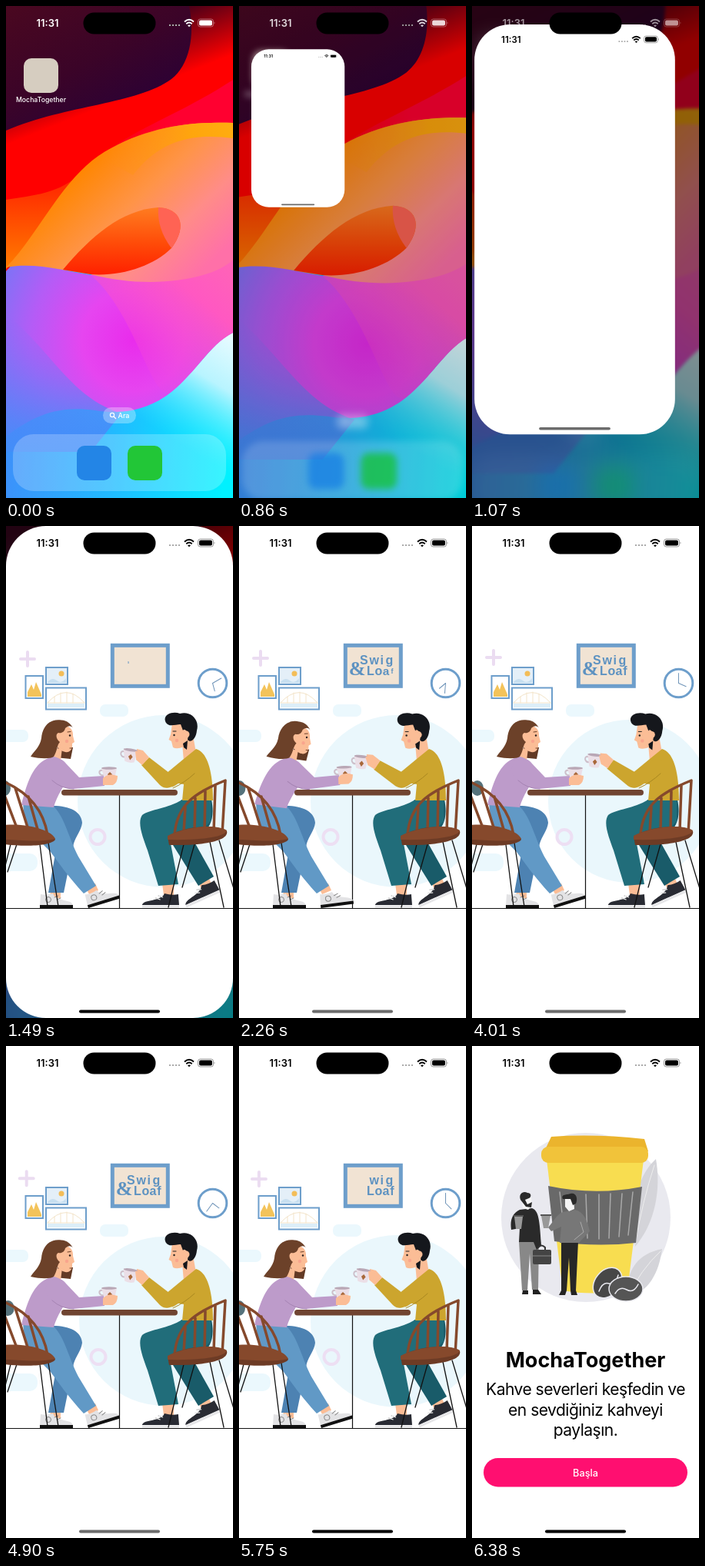
An HTML page that plays this animation: 295x640 px, repeating every 6450 ms.

```html
<!DOCTYPE html>
<html lang="tr">
<head>
<meta charset="utf-8">
<title>MochaTogether</title>
<style>
  html, body { margin: 0; width: 100%; height: 100%; overflow: hidden; background: #fff; }
  svg { display: block; width: 100vw; height: 100vh; font-family: Inter, "Open Sans", sans-serif; }
  text { text-anchor: middle; }
  .line { fill: none; stroke-linecap: round; stroke-linejoin: round; }
  .rail { stroke: #85492c; stroke-width: 3.5; }
  .leg { stroke: #111; stroke-width: 1.3; }
  .frame { stroke: #6d9ecb; stroke-width: 2; fill: #fff; }
  .skin { fill: #fbbd96; }
  .letter { font: bold 16px "Liberation Sans", Arial, sans-serif; fill: #5d92c1; }
  .amp { font: bold 26px "Liberation Serif", serif; }
</style>
</head>
<body>
<svg viewBox="0 0 295 640" preserveAspectRatio="none">
  <defs>
    <linearGradient id="dusk" x2=".75" y2="1"><stop stop-color="#4a0820"/><stop offset=".5" stop-color="#3b0428"/><stop offset="1" stop-color="#26003a"/></linearGradient>
    <linearGradient id="red" gradientUnits="userSpaceOnUse" x1="235" y1="0" x2="265" y2="75"><stop stop-color="#480018"/><stop offset="1" stop-color="#f00"/></linearGradient>
    <linearGradient id="crimson" x1="0" x2=".6"><stop stop-color="#f00"/><stop offset="1" stop-color="#ff0030"/></linearGradient>
    <linearGradient id="flame" x2="0" y2="1"><stop stop-color="#ff1c00"/><stop offset="1" stop-color="#ff7c00"/></linearGradient>
    <linearGradient id="orange" x2="1" y2=".75"><stop stop-color="#ff6a00"/><stop offset=".35" stop-color="#ff8600"/><stop offset=".6" stop-color="#ff9448"/><stop offset=".8" stop-color="#ff8c88"/><stop offset="1" stop-color="#ff70a8"/></linearGradient>
    <linearGradient id="gold" x1="0" x2="1"><stop stop-color="#ff8a10" stop-opacity="0"/><stop offset=".7" stop-color="#ffa60c"/><stop offset="1" stop-color="#ffac10"/></linearGradient>
    <linearGradient id="ember" x2="0" y1="0" y2="1"><stop stop-color="#ff7c20"/><stop offset=".55" stop-color="#ff4a08"/><stop offset="1" stop-color="#ff2000"/></linearGradient>
    <radialGradient id="violet" gradientUnits="userSpaceOnUse" cx="165" cy="435" r="190"><stop stop-color="#e92cec"/><stop offset=".35" stop-color="#e645f0"/><stop offset=".7" stop-color="#b45cf6"/><stop offset="1" stop-color="#7d73f6"/></radialGradient>
    <linearGradient id="rose" x1=".3" y1="1" x2="1" y2="0"><stop stop-color="#f344dd" stop-opacity="0"/><stop offset=".6" stop-color="#ff58c2"/><stop offset="1" stop-color="#ff6ab0"/></linearGradient>
    <linearGradient id="sea" x1="0" x2="1" y1=".55" y2=".7"><stop stop-color="#3f8cfa"/><stop offset=".5" stop-color="#22b9ff"/><stop offset="1" stop-color="#00f1ff"/></linearGradient>
    <linearGradient id="foam" gradientUnits="userSpaceOnUse" x1="290" y1="430" x2="210" y2="560"><stop stop-color="#e6fbff"/><stop offset=".4" stop-color="#b8f4ff"/><stop offset="1" stop-color="#40e4ff" stop-opacity="0"/></linearGradient>
    <linearGradient id="haze" x2="0" y2="1"><stop stop-color="#7d73f6" stop-opacity="0"/><stop offset="1" stop-color="#418ef9"/></linearGradient>
    <clipPath id="cardClip"><rect id="cardRect"/></clipPath>
    <g id="status" fill="currentColor">
      <text x="54" y="27" font-size="13" font-weight="600">11:31</text>
      <path d="M212 25h2m2 0h2m2 0h2m2 0h2" stroke="#aaa" stroke-width="2"/>
      <g fill="none" stroke="currentColor" stroke-width="2"><path d="M232 20.5q6-5.4 12 0M234.3 23.2q3.7-3.3 7.4 0"/></g>
      <path d="M236 25.2q2-1.6 4 0l-2 2z"/>
      <rect x="249.5" y="17" width="20" height="10" rx="3" fill="none" stroke="currentColor" stroke-opacity=".4"/>
      <rect x="251" y="18.5" width="17" height="7" rx="2"/><path d="M270.5 20.5q2 1.5 0 3z" opacity=".4"/>
    </g>
    <g id="mug">
      <path class="line" d="M-8-4c-7-2-6 8 2 6" stroke="#cdbfca" stroke-width="2"/>
      <path d="M-10-7H10L7 7Q0 9-6 7Z" fill="#ebdfe7"/><ellipse cy="-7" rx="10" ry="1.7" fill="#b9a7b5"/>
      <path d="M1-2l3 3-3 4-3-4z" fill="#a8683a"/>
    </g>
    <g id="shoe">
      <path d="M1-18Q8-16 17-19C21-8 41-12 43-4H0Z"/><path d="M19-14l5-2m-2 5l5-2" class="line" stroke="#888"/>
    </g>
    <g id="sneaker">
      <use href="#shoe" fill="#e3e3e5"/><path d="M0-2H43" stroke="#111" stroke-width="4"/><circle cx="11" cy="-11" r="3.5" fill="none" stroke="#888"/>
    </g>
  </defs>

  <g id="wallpaper">
    <rect width="295" height="640" fill="url(#sea)"/>
    <path d="M295 423C268 438 248 475 215 500C190 522 160 530 130 526V640H295Z" fill="url(#foam)"/>
    <path d="M0 335C40 333 75 345 110 350L295 300V425C265 440 248 475 215 502C185 526 150 532 116 526C70 520 40 530 0 560Z" fill="url(#violet)"/>
    <path d="M0 400C60 450 85 510 150 530L110 580H0Z" fill="url(#haze)"/>
    <path d="M110 350L295 290V425C265 440 248 475 215 502C190 520 170 400 110 350Z" fill="url(#rose)"/>
    <path d="M0 0H295V160L120 215L0 345Z" fill="url(#red)"/>
    <path d="M110 207C150 165 220 145 295 96V160L110 215Z" fill="url(#crimson)"/>
    <path d="M0 252C35 246 70 245 100 215L60 290L0 342Z" fill="url(#flame)"/>
    <path d="M0 340C40 300 70 230 120 195C180 155 250 150 295 152V330C270 355 190 370 110 349C75 345 40 333 0 340Z" fill="url(#orange)"/>
    <path d="M165 220C200 175 240 165 295 172V152C245 150 180 155 120 195Z" fill="url(#gold)"/>
    <path d="M74 343C110 300 150 265 198 262C226 263 237 285 215 315C192 338 150 352 110 349Z" fill="url(#ember)"/>
    <path d="M198 262C226 263 237 285 215 315Q196 290 198 262Z" fill="#ff6354"/>
    <path d="M0 0H238C246 40 238 77 215 95C170 128 80 128 0 162Z" fill="url(#dusk)"/>
  </g>
  <g id="apps" fill="#fff">
    <rect x="23" y="68" width="45" height="45" rx="10" fill="#d6cdc0"/>
    <text x="45.5" y="125" font-size="8.7" font-weight="500">MochaTogether</text>
    <rect x="126" y="522" width="43" height="21" rx="10.5" fill-opacity=".3"/>
    <circle cx="138" cy="532" r="2.6" fill="none" stroke="#fff" stroke-width="1.2"/><path d="M140 534l3 3" stroke="#fff" stroke-width="1.3"/>
    <text x="153" y="536" font-size="9" font-weight="500">Ara</text>
    <rect x="9" y="557" width="277" height="74" rx="27" fill-opacity=".22"/>
    <rect x="92" y="572" width="45" height="45" rx="10" fill="#2385e6"/>
    <rect x="158" y="572" width="45" height="45" rx="10" fill="#22c637"/>
  </g>
  <use id="homeStatus" href="#status" color="#fff"/>

  <g id="card" clip-path="url(#cardClip)">
    <rect width="295" height="640" fill="#fff"/>
    <g id="content">
      <g id="scene">
        <circle id="halo" cx="205" cy="358" fill="#eaf7fc"/>
        <g fill="#ebf8fd"><rect x="122" y="232" width="37" height="16" rx="7"/><rect x="-12" y="265" width="41" height="16" rx="7"/><rect x="-12" y="426" width="53" height="23" rx="10"/></g>
        <g id="drift" class="line" stroke="#ebdcf1" stroke-width="4"><path d="M28 164V182M19 173H37"/></g>
        <circle id="ring" cx="119" cy="404.5" r="9.5" fill="none" stroke="#eddff3" stroke-width="4"/>
        <g class="frame"><rect x="25.5" y="195" width="22.5" height="29"/><rect x="52" y="184" width="28" height="22" fill="#e4eff8"/><rect x="52" y="210.5" width="52" height="28"/></g>
        <path d="M28 222V216L33 206L36 213L39 203L46 219V222Z" fill="#f3c35a"/><circle cx="72" cy="192" r="3.5" fill="#f3bd58"/><path d="M54 203q6-7 12-2t12-3v6H54z" fill="#c7dff0"/>
        <path class="line" d="M54 230Q78 203 102 230M54 230H102M63 222v8m8-13v13m8-14v14m8-12v12" stroke="#f3e4c9"/><path d="M54 231h48v5H54z" fill="#dceef8"/>
        <rect x="138.3" y="155.3" width="72" height="53" fill="#f1e3d3" stroke="#6d9ecb" stroke-width="5"/>
        <g id="sign"></g>
        <circle cx="268.5" cy="204.5" r="18.3" fill="#fff" stroke="#6d9ecb" stroke-width="3"/>
        <g class="line" stroke="#6f94b8"><path id="minute" d="M268.5 204.5v-13"/><path id="hour" d="M268.5 204.5v-10.5"/></g>
        <path d="M0 497.5H295M147.5 350V497" stroke="#111" stroke-width="1.2"/>
        <ellipse id="bag" cy="341" rx="8" ry="10" fill="#55727b"/>

        <!-- her legs -->
        <path class="skin" d="M58 474h13v10H57zM104 471l12-6 4 9-12 5z"/>
        <path d="M40 366C72 360 98 367 99 386C98 396 91 403 88 413L75 477H55L67 410Z" fill="#4d82b2"/>
        <path d="M22 360L60 363C76 377 80 402 94 430L117 468L101 478C80 455 70 440 58 424L38 404C28 395 23 380 22 360Z" fill="#6199c6"/>
        <use href="#sneaker" transform="translate(44 497)"/>
        <use id="herFoot" href="#sneaker"/>
        <!-- his legs -->
        <path class="skin" d="M203 465h15v15h-13zM250 464l13-8 6 15-13 5z"/>
        <path d="M228 356H267C273 385 262 400 242 406L270 456L250 468L212 407Z" fill="#195b69"/>
        <path d="M229 356C210 368 188 368 177 376C170 386 178 405 184 422L198 468L224 466L213 408L250 401L266 384V356Z" fill="#216d7a"/>
        <g id="hisShoe" transform="translate(225 497) scale(-1.12 1)"><use href="#shoe" fill="#292b33"/><path d="M0-2H43" stroke="#e6e6e8" stroke-width="3"/><path d="M19-14l5-2m-2 5l5-2" stroke="#eee"/></g>
        <use href="#hisShoe" transform="translate(279 477) rotate(-24) translate(-225 -497)"/>

        <!-- her -->
        <g id="her">
          <path d="M68 284L87 288L84 303L64 301Z" fill="#633a25"/>
          <path class="skin" d="M60 290L73 289L71 305L58 307Z"/>
          <path d="M62 300C38 304 28 329 20 363L62 366C66 350 78 335 84 320C80 309 70 301 62 300Z" fill="#bd9bca"/>
          <path class="skin" d="M66 263C80 255 88 264 87 273L89 281L86 283C87 293 80 297 72 292L62 284Z"/>
          <path d="M72 252.500C56 250 47 262 46 276C44 288 36 293 32 300C45 303 58 303 62 300C67 292 66 285 70 281C65 277 64 271 68 269C72 270 76 268 77 263C82 259 85 260 87 263C84 256 78 253 72 252.500Z" fill="#6c4129"/>
          <path class="line" d="M80 268l4-.5M83 289h3" stroke="#6c4129"/><circle cx="83" cy="272.5" r="1.2" fill="#2b2020"/><circle cx="79" cy="280" r="2.2" fill="#f9a58d"/>
        </g>
        <!-- him -->
        <path class="skin" d="M229 283L243 273L248 300L231 306Z"/>
        <path d="M231 303L247 290C262 294 269 320 269 357H229L231 336L208 332V322Z" fill="#cca52e"/>
        <g id="hisHead">
          <path class="skin" d="M216 257L214 271L211.500 278L215 280L217 288C223 291 231 288 237 283L243 270L238 257Z"/>
          <path d="M208 256C202 246 216 240 226 244C240 240 252 252 248 266C247 277 240 283 236 278C238 268 232 262 230 266L227 258C220 258 212 262 208 256Z" fill="#15171c"/>
          <circle class="skin" cx="234" cy="271" r="4.5"/>
          <path d="M230 283l6-4-1 12-4-3z" fill="#15171c"/><path class="line" d="M217 267h4" stroke="#222"/><circle cx="218.500" cy="272" r="1.200" fill="#222"/><circle cx="222" cy="279" r="2.200" fill="#f9a58d"/>
        </g>

        <rect x="72" y="343" width="151" height="7.500" rx="3.700" fill="#704431"/>
        <g id="herArm">
          <path d="M50 319C54 302 70 298 78 309L95 327L127 325L128 338L88 342C75 342 60 335 50 319Z" fill="#bd9bca"/>
          <path class="line" d="M60 331Q72 342 88 342" stroke="#a583b3"/>
          <use href="#mug" transform="translate(134 322)"/>
          <path class="skin" d="M126 328C132 322 138 323 145 325Q145 334 139 337L126 337Z"/>
        </g>
        <g id="hisArm">
          <path d="M212 321L186 301L176 311L200 337C209 345 220 340 218 327Z" fill="#cca52e"/>
          <path class="skin" d="M186 301L178 292L170 290L169 304L177 311Z"/>
          <use id="hisMug" href="#mug"/>
          <path class="skin" d="M168 293q6-2 9 3l-3 8-5-2z"/>
        </g>
        <path class="line" d="M241 312L214 330" stroke="#cca52e" stroke-width="19"/><path class="line" d="M245 322Q232 334 217 341" stroke="#a8871f"/>

        <!-- chairs -->
        <path class="line leg" d="M6 414L-8 470M14 414L2 450M44 414L54 495M55 412L68 495"/>
        <path class="line rail" d="M-2 333C25 345 48 365 54 402M-4 345L15 395M12 341L29 395M29 352L42 398"/>
        <path d="M-2 390C30 387 61 398 64 408C58 417 20 417-2 414Z" fill="#6d3b25"/><path d="M-2 389C30 386 61 397 64 407C40 412 15 408-2 408Z" fill="#86492c"/>
        <path class="line leg" d="M231 414L211 496M245 414L229 470M265 411L283 496M277 409L297 475"/>
        <path class="line rail" d="M219 402C222 360 250 345 285 331L281 400M233 366L231 398M246 354L245 396M259 345L258 396M272 338L270 396"/>
        <path d="M210 404C230 390 272 387 287 397C290 409 260 416 212 415Z" fill="#6d3b25"/><path d="M210 403C230 392 272 386 287 396C285 405 250 409 210 408Z" fill="#86492c"/>
      </g>

      <g id="welcome">
        <rect width="295" height="640" fill="#fff"/>
        <circle cx="148" cy="223" r="110" fill="#e9e9ef"/>
        <path d="M239 147C216 168 206 205 211 262C238 232 246 186 239 147ZM247 264C215 270 200 292 201 328C230 320 243 295 247 264Z" fill="#d4d4d9"/><path class="line" d="M237 155Q222 200 211 262M245 267Q220 290 201 328" stroke="#eee"/>
        <path d="M97 148H223L202 318Q155 325 118 318Z" fill="#f8dd50"/>
        <path d="M103 118Q160 114 224 121L229 137H94Z" fill="#ebb42d"/><rect x="90" y="131" width="139" height="21" rx="9" fill="#f1c33a"/>
        <path d="M99 182Q160 195 221 183L213 256Q160 262 107 254Z" fill="#696969"/>
        <path class="line" d="M165 193v58M180 192l-2 58M195 192l-4 56M209 190l-6 56M148 193l2 57M114 190l6 55" stroke="#aaa" stroke-width="1.5"/>
        <g class="line" stroke="#e9e9ef" stroke-width="1.5"><ellipse cx="176" cy="308" rx="16" ry="22" transform="rotate(40 176 308)" style="fill:#474747"/><path d="M165 319Q170 306 178 309T190 298"/><ellipse cx="200" cy="316" rx="22" ry="16" style="fill:#555"/><path d="M186 322Q192 312 201 317T216 310"/></g>
        <path d="M61 254H87L86 317H78L75 270L72 318H65Z" fill="#888"/><path d="M116 254H138L135 318H128L126 275L123 318H116Z" fill="#272727"/>
        <path d="M66 318h7v5H65zm13-1h7l4 6H79zm37 1h7l-2 6h-8zm12 0h7l2 6h-8z" fill="#222"/>
        <path d="M62 213L78 211C87 214 88 228 90 260L84 265L80 255H61L62 237L51 239C49 226 53 217 62 213Z" fill="#2a2a2a"/>
        <path d="M118 216L134 213C146 216 150 228 153 241L139 256H114L116 235L103 241L99 236C107 227 110 219 118 216Z" fill="#777"/><path class="line" d="M141 229L145 242L133 252" stroke="#aaa"/>
        <g fill="#f5f5f5"><path d="M65 197h12l1 11-5 5-7-2z"/><path d="M121 197h11l1 15-7 3-5-6z"/></g>
        <path d="M63 200C60 192 67 188 72 191C78 191 77 197 74 198L69 200L72 206L78 203L77 210L70 209ZM118 199C115 192 124 194 128 192C135 190 138 198 135 205L131 207L128 199Z" fill="#2a2a2a"/>
        <path class="line" d="M86 262q4-5 9 0v4" stroke="#333" stroke-width="2"/><rect x="79" y="265" width="24" height="19" rx="2" fill="#444"/><path d="M79 273h24" stroke="#888"/>
        <path d="M55 222h11l-2 16h-7zM90 221h12l-3 16h-6z" fill="#999"/><path d="M54 221h13M89 220h14" stroke="#555" stroke-width="2"/>
        <text x="147.5" y="418" font-size="27" font-weight="700">MochaTogether</text>
        <g font-size="21" letter-spacing="-.5"><text x="147.5" y="454">Kahve severleri keşfedin ve</text><text x="147.5" y="480.5">en sevdiğiniz kahveyi</text><text x="147.5" y="507">paylaşın.</text></g>
        <rect x="15" y="536" width="265" height="37.5" rx="18.7" fill="#ff0f70"/>
        <text x="147.5" y="559.5" font-size="12.7" font-weight="500" fill="#fff">Başla</text>
      </g>
      <use href="#status"/>
    </g>
    <g id="bar"><rect x="95" y="629.5" width="105" height="4" rx="2"/></g>
  </g>
  <rect x="100.5" y="8.5" width="94" height="28" rx="14"/>
</svg>

<script>
const LOOP = 6450;
const $ = id => document.getElementById(id);
const set = (id, attributes) => {
  for (const name in attributes) $(id).setAttribute(name, attributes[name]);
};
const show = (id, on) => { $(id).style.display = on ? "" : "none"; };
const ramp = (t, from, to) => Math.min(1, Math.max(0, (t - from) / (to - from)));
const smooth = (t, from, to) => { const u = ramp(t, from, to); return u * u * (3 - 2 * u); };
const mix = (a, b, p) => a + (b - a) * p;

// Piecewise linear value through [time, value] points.
function along(t, points) {
  let value = points[0][1];
  for (let i = 1; i < points.length; i++) {
    const [t0, a] = points[i - 1], [t1, b] = points[i];
    if (t >= t0) value = mix(a, b, ramp(t, t0, t1));
  }
  return value;
}

// Letters in the order in which they pop in and out.
const letters = [
  ["S", 162.3, 174.5], ["&", 153.5, 185], ["w", 175.8, 174.5], ["i", 185.7, 174.5], ["g", 195.5, 174.5],
  ["L", 171, 188.5], ["o", 181.3, 188.5], ["a", 191, 188.5], ["f", 199, 188.5]
].map(([char, x, y]) => {
  const node = document.createElementNS("http://www.w3.org/2000/svg", "text");
  node.textContent = char;
  node.setAttribute("class", char === "&" ? "letter amp" : "letter");
  node.setAttribute("dy", ".36em");
  $("sign").append(node);
  return { node, x, y };
});

function step(t) {
  if (t < 860) return 0;
  if (t < 1490) return 860 + Math.floor((t - 860) / 105) * 105;
  return 1490 + Math.floor((t - 1490) / 109.2) * 109.2;
}

function drawOpening(t) {
  const left = 1 - ramp(t, 800, 1490);
  const grow = power => 1 - left ** power;
  const p = grow(4), x = mix(23, 0, p), y = mix(68, 0, grow(2.1));
  const width = mix(45, 295, p), height = mix(45, 640, grow(3.46)), scale = width / 295;
  const opening = t >= 860, settled = t > 1590;
  for (const id of ["wallpaper", "apps", "homeStatus"]) show(id, !settled);
  show("card", opening);
  const progress = opening ? p : 0;
  const zoom = `translate(147.5 320) scale(${1 + 0.125 * progress}) translate(-147.5 -320)`;
  set("wallpaper", { transform: zoom });
  set("apps", { transform: zoom, opacity: 1 - 0.8 * progress });
  $("wallpaper").style.filter = opening ? `blur(${2 * p}px) brightness(${1 - 0.5 * p})` : "none";
  $("apps").style.filter = opening ? `blur(${14 * p}px)` : "none";
  set("homeStatus", { opacity: 1 - 0.5 * progress });
  set("cardRect", { x, y, width, height, rx: settled ? 0 : mix(10, 52, p) });
  set("content", { transform: `translate(${x} ${y}) scale(${scale})` });
  const dark = (t > 1380 && !settled) || t > 5420;
  set("bar", {
    transform: `translate(${x} ${y + height - 640 * scale}) scale(${scale})`,
    fill: dark ? "#000" : "#6c6c6c"
  });
  show("scene", t >= 1380);
}

function drawScene(time) {
  const t = Math.min(time, 5450);
  const hers = smooth(t, 1650, 2750) - smooth(t, 3200, 3950);
  const his = smooth(t, 1650, 2750) - smooth(t, 3200, 4700);
  const lean = `rotate(${5.5 * hers} 40 365)`;
  set("halo", { r: 112 - 6 * (smooth(t, 3020, 4010) - smooth(t, 4010, 5450)) });
  set("her", { transform: lean });
  set("herArm", { transform: `${lean} rotate(${-9 * hers} 62 316)` });
  set("herFoot", { transform: `translate(${mix(107, 106, hers)} 497) rotate(${mix(-17, 0, hers)})` });
  set("hisArm", { transform: `translate(${5 * his} 0) rotate(${-17 * his} 208 335)` });
  set("hisMug", { transform: `translate(161 299) rotate(${8 + 13 * his}) scale(.95 1.1)` });
  set("hisHead", { transform: `translate(${-1.5 * his} ${his})` });
  set("minute", { transform: `rotate(${along(t, [[1490, 60], [3020, 310], [4010, 360], [5450, 720]])} 268.5 204.5)` });
  set("hour", { transform: `rotate(${along(t, [[1490, 165], [3020, 295], [4010, 475], [5450, 495]])} 268.5 204.5)` });
  set("bag", { cx: along(t, [[1490, -2], [3020, 3], [4010, 7], [5450, 0]]) });
  set("drift", { transform: `translate(${-2 * smooth(t, 4010, 5450)} ${-2 * (smooth(t, 1490, 3020) - smooth(t, 4010, 5450))})` });
  set("ring", { cx: mix(119, 120, smooth(t, 3020, 4010)) });
  letters.forEach(({ node, x, y }, i) => {
    const popIn = 1440 + i * 85, popOut = 5000 + i * 230;
    const size = smooth(t, popIn, popIn + 250) - smooth(t, popOut, popOut + 220);
    const dot = i === 0 && time < 1600;
    node.setAttribute("transform", dot ? "translate(159 178) scale(.2)" : `translate(${x} ${y}) scale(${size})`);
  });
}

function draw(now) {
  const t = step(now % LOOP);
  drawOpening(t);
  drawScene(t);
  const fade = ramp(t, 5750, 6070);
  set("welcome", { opacity: fade });
  show("welcome", fade > 0);
}

const start = performance.now();
function tick() {
  draw(performance.now() - start);
  requestAnimationFrame(tick);
}
tick();
</script>
</body>
</html>
```
